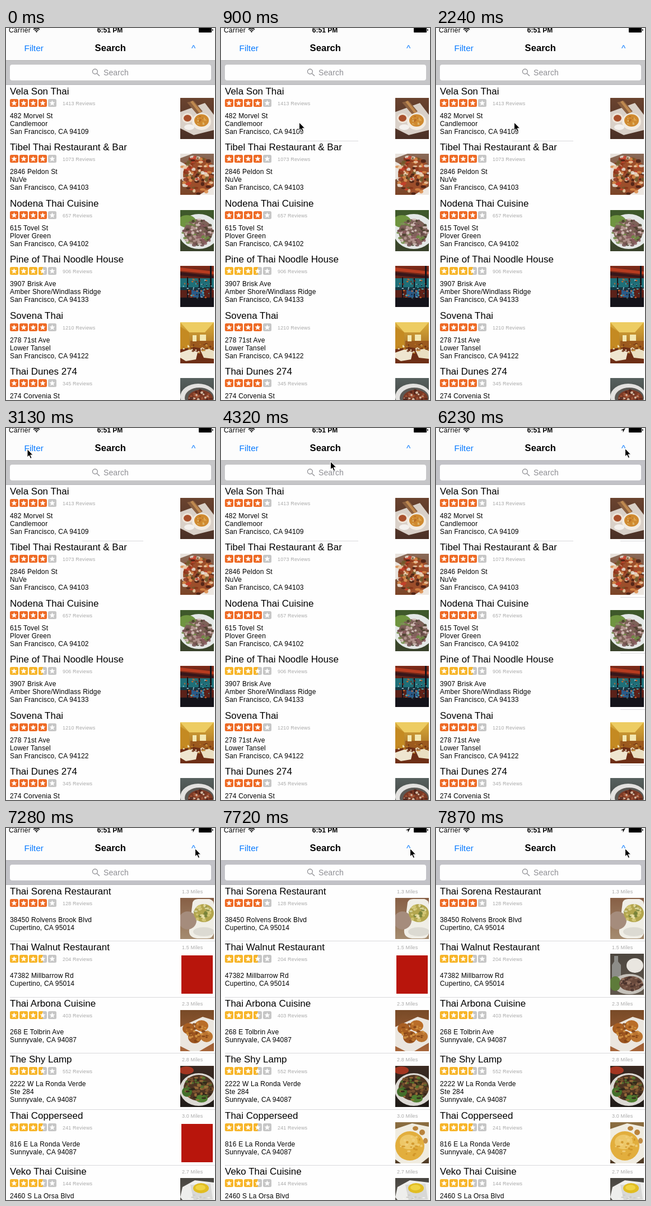
Animation, 373 px wide and 660 px high, one loop 8 s. Source, as an HTML page:

```html
<!DOCTYPE html>
<html lang="en">
<head>
<meta charset="utf-8">
<title>Restaurant search</title>
<style>
  html, body { margin: 0; width: 100%; height: 100%; overflow: hidden; background: #fefefe; }
  svg { display: block; }
  text { font-family: "Liberation Sans", Arial, sans-serif; white-space: pre; }
  .name { font-size: 17px; }
  .addr { font-size: 12px; letter-spacing: .2px; }
  .small { font-size: 9px; letter-spacing: .15px; fill: #aaa; }
  .blue { font-size: 15.5px; fill: #0a7bff; }
</style>
</head>
<body>
<script>
const LOOP = 8000;
const NS = "http://www.w3.org/2000/svg";

function add(parent, tag, attrs = {}, text) {
  const el = document.createElementNS(NS, tag);
  for (const k in attrs) el.setAttribute(k, attrs[k]);
  if (text !== undefined) el.textContent = text;
  parent.append(el);
  return el;
}
const rect = (p, x, y, width, height, fill, more) => add(p, "rect", { x, y, width, height, fill, ...more });
const label = (p, x, y, cls, text, more) => add(p, "text", { x, y, class: cls, ...more }, text);

function random(seed) {
  return () => {
    seed = (seed * 16807) % 2147483647;
    return seed / 2147483647;
  };
}

// Photos: base tones, shapes as [fill, path] or [fill, cx, cy, rx, ry], then scattered bits
const photos = {
  platter: {
    base: ["#6a432f", "#4a3026"],
    shapes: [["#d9d0c8", "M0 25L44 9L60 30V57L24 66L0 54Z"], ["#8d6140", "M12 8L24 5L40 24L30 29Z"],
      ["#c08a50", "M18 7L22 5L38 25L34 27Z"], ["#eee4d8", 13, 36, 10, 9], ["#a9502c", 13, 36, 7, 6],
      ["#f3ece2", 38, 42, 17, 15], ["#cf8a30", 38, 40, 13, 11], ["#f4f1ee", 16, 52, 9, 5]],
    bits: { seed: 11, colors: ["#e6b258", "#b26424", "#e0c58a"], at: [37, 40, 10, 8], n: 16, size: 3 }
  },
  stirFry: {
    base: ["#8a6a58", "#7b4426"],
    shapes: [["#e8e2dc", "M0 8L22 0H0ZM0 14L16 22L8 42L0 46Z"], ["#9c4e2b", 34, 38, 29, 32],
      ["#eee8e2", "M34 73L60 58V73Z"]],
    bits: { seed: 23, colors: ["#d98a48", "#8c3219", "#efcfaa", "#c6412a", "#4a2216", "#e9e2d6", "#6f5a2c"], at: [31, 38, 30, 34], n: 110, size: 7 }
  },
  salad: {
    base: ["#3f5a2b", "#39422b"],
    shapes: [["#e4e8e6", 33, 38, 36, 31], ["#6f9540", 12, 20, 16, 11], ["#7d6258", 32, 39, 26, 23]],
    bits: { seed: 37, colors: ["#b99a95", "#6f4c4c", "#6d8a42", "#d9c6c0", "#8b5c60", "#46402c"], at: [32, 39, 27, 24], n: 105, size: 6 }
  },
  bar: {
    base: ["#7e2a18", "#15141c"],
    shapes: [["#b83c20", "M0 3L60 10V15L0 9Z"], ["#37161a", "M0 11L60 18V22L0 17Z"], ["#1f6f78", "M0 22H60V38H0Z"],
      ["#143844", "M0 38H60V43H0Z"], ["#5a2119", "M0 43H20V56H0ZM42 40H60V56H42Z"], ["#2a5c8a", "M20 43H42V56H20Z"],
      ["#14131a", "M0 57H60V73H0ZM53 0H56V60H53ZM12 20H14V57H12ZM33 22H35V57H33Z"]],
    bits: { seed: 41, colors: ["#4fc0c4", "#d26a2d", "#1c2230", "#7a2218", "#9cc6d6"], at: [30, 41, 30, 18], n: 60, size: 3 }
  },
  room: {
    base: ["#dcae3a", "#8a4d1a"],
    shapes: [["#edcc62", "M0 0H60L44 18H16Z"], ["#c48a22", "M0 8L16 18V46L0 52Z"], ["#9c5a1e", "M18 33H60V48H18Z"],
      ["#f3e7b0", "M22 23H29V34H22ZM35 22H46V33H35Z"], ["#6e2f16", "M0 48L24 44L60 50V73H0Z"],
      ["#efe6d0", "M0 54L17 48L31 53L28 66L10 69L0 63Z"], ["#eadfc2", "M36 50L52 47L60 51V65L42 63Z"]],
    bits: { seed: 53, colors: ["#6a3014", "#f3e9c8", "#b97a22"], at: [31, 46, 28, 9], n: 30, size: 4 }
  },
  bowl: {
    base: ["#57615f", "#33302e"],
    shapes: [["#e2e1df", 32, 33, 32, 23], ["#5c5a56", 34, 35, 26, 18], ["#7c3a25", 36, 36, 22, 15]],
    bits: { seed: 61, colors: ["#a9583a", "#e2cdb6", "#4f231a"], at: [36, 36, 20, 14], n: 34, size: 5 }
  },
  curry: {
    base: ["#875f45", "#a58c70"],
    shapes: [["#f0eee6", "M22 8Q24 2 32 2H52Q60 4 60 12V62Q58 72 48 72H30Q14 70 16 56Z"], ["#a58c7c", 13, 40, 16, 16],
      ["#b3a64e", 42, 27, 18, 16], ["#dcdad2", 42, 60, 19, 8]],
    bits: { seed: 71, colors: ["#d3c877", "#738037", "#e9dfa8"], at: [41, 27, 16, 14], n: 34, size: 6 }
  },
  rice: {
    base: ["#4d4740", "#60564c"],
    shapes: [["#8d8d89", "M7 4H14V14L19 20V44H3V20L7 14Z"], ["#e9e6e0", 44, 21, 15, 13], ["#c5c1ba", 34, 54, 29, 18],
      ["#5e7b3a", 9, 53, 10, 13], ["#6a4a3c", 37, 53, 21, 13]],
    bits: { seed: 83, colors: ["#9a7866", "#46302a", "#7d5a4b"], at: [37, 53, 20, 12], n: 50, size: 5 }
  },
  fritters: {
    base: ["#784a27", "#a7653a"],
    shapes: [["#ebe6df", "M0 30L40 12L60 18V58L34 73H18L0 64Z"], ["#a95f22", 15, 33, 11, 10], ["#b96d28", 38, 28, 12, 10],
      ["#9c5520", 26, 48, 12, 11], ["#bb7430", 47, 47, 11, 10]],
    bits: { seed: 97, colors: ["#d29548", "#834315", "#c5802f"], at: [31, 40, 23, 16], n: 40, size: 5 }
  },
  greens: {
    base: ["#3b2a22", "#1f1b18"],
    shapes: [["#a43520", 11, 8, 13, 7], ["#dcd9d4", 33, 42, 34, 29], ["#4d3523", 33, 39, 27, 23],
      ["#426f2a", 12, 46, 9, 9], ["#4f7e30", 38, 58, 11, 7]],
    bits: { seed: 101, colors: ["#7e5530", "#2f2119", "#55782f", "#a0713c"], at: [33, 39, 25, 22], n: 70, size: 6 }
  },
  tray: {
    base: ["#8d6f41", "#4f3a25"],
    shapes: [["#f0ece0", "M0 12L30 2L60 8V62L46 73H10L0 66Z"], ["#e2ae3d", 26, 42, 26, 26], ["#edc768", 24, 35, 16, 13],
      ["#b9833c", 36, 11, 5, 4], ["#b9833c", 48, 18, 5, 5], ["#c18d45", 54, 33, 4, 5]],
    bits: { seed: 113, colors: ["#f1cf7b", "#cf9226"], at: [28, 42, 20, 20], n: 22, size: 5 }
  },
  takeaway: {
    base: ["#47443f", "#75726c"],
    shapes: [["#eeeeec", "M4 16L26 4L60 8V46H10L0 34Z"], ["#d8d8d6", "M18 12L54 10L58 38L24 40Z"],
      ["#e1bd22", 37, 18, 14, 9], ["#f0d445", 36, 17, 9, 5]],
    bits: { seed: 127, colors: ["#f4f4f2", "#c9c8c4"], at: [34, 35, 20, 6], n: 10, size: 4 }
  }
};

// name | rating | reviews | distance | photo | address lines
const firstList = [
  "Vela Son Thai|4|1413||platter|482 Morvel St|Candlemoor|San Francisco, CA 94109",
  "Tibel Thai Restaurant & Bar|4|1073||stirFry|2846 Peldon St|NuVe|San Francisco, CA 94103",
  "Nodena Thai Cuisine|4|657||salad|615 Tovel St|Plover Green|San Francisco, CA 94102",
  "Pine of Thai Noodle House|3.5|906||bar|3907 Brisk Ave|Amber Shore/Windlass Ridge|San Francisco, CA 94133",
  "Sovena Thai|4|1210||room|278 71st Ave|Lower Tansel|San Francisco, CA 94122",
  "Thai Dunes 274|4|345||bowl|274 Corvenia St||"
];
const secondList = [
  "Thai Sorena Restaurant|4|128|1.3|curry|38450 Rolvens Brook Blvd|Cupertino, CA 95014",
  "Thai Walnut Restaurant|3.5|204|1.5|rice|47382 Millbarrow Rd|Cupertino, CA 95014",
  "Thai Arbona Cuisine|3.5|403|2.3|fritters|268 E Tolbrin Ave|Sunnyvale, CA 94087",
  "The Shy Lamp|3.5|552|2.8|greens|2222 W La Ronda Verde|Ste 284|Sunnyvale, CA 94087",
  "Thai Copperseed|3.5|241|3.0|tray|816 E La Ronda Verde|Sunnyvale, CA 94087",
  "Veko Thai Cuisine|3.5|144|2.7|takeaway|2460 S La Orsa Blvd||"
];

const rowTop = i => Math.round(101 + 99.4 * i);

const starPath = Array.from({ length: 10 }, (_, k) => {
  const r = k % 2 ? 2.3 : 5.5, a = (k * 36 - 90) * Math.PI / 180;
  return (k ? "L" : "M") + (7.5 + r * Math.cos(a)).toFixed(2) + " " + (7.4 + r * Math.sin(a)).toFixed(2);
}).join("") + "Z";

function drawStars(parent, y, rating) {
  const color = rating === 4 ? "#ee6a25" : "#f7b529";
  for (let i = 0; i < 5; i++) {
    const g = add(parent, "g", { transform: `translate(${7 + 17 * i} ${y})` });
    const part = Math.max(0, Math.min(1, rating - i));
    rect(g, 0, 0, 15, 14, part === 1 ? color : "#c6c6c6", { rx: 2.5 });
    if (part === 0.5) add(g, "path", { d: "M7.5 0H2.5Q0 0 0 2.5V11.5Q0 14 2.5 14H7.5Z", fill: color });
    add(g, "path", { d: starPath, fill: "#fff" });
  }
}

function drawPhoto(parent, y, key) {
  const { base, shapes, bits } = photos[key];
  const box = add(parent, "svg", { x: 311, y, width: 60, height: 73 });
  const grad = add(box, "linearGradient", { id: key, x2: 0, y2: 1 });
  base.forEach((c, i) => add(grad, "stop", { offset: i, "stop-color": c }));
  rect(box, 0, 0, 60, 73, `url(#${key})`);
  for (const [fill, first, cy, rx, ry] of shapes) {
    if (typeof first === "string") add(box, "path", { d: first, fill });
    else add(box, "ellipse", { cx: first, cy, rx, ry, fill });
  }
  const rnd = random(bits.seed), [x0, y0, w, h] = bits.at;
  for (let i = 0; i < bits.n; i++) {
    const a = rnd() * Math.PI * 2, d = Math.sqrt(rnd());
    add(box, "ellipse", {
      cx: x0 + w * d * Math.cos(a), cy: y0 + h * d * Math.sin(a),
      rx: bits.size * (0.3 + 0.4 * rnd()), ry: bits.size * (0.2 + 0.3 * rnd()),
      fill: bits.colors[i % bits.colors.length], opacity: 0.85
    });
  }
  return box;
}

function drawList(parent, rows) {
  const g = add(parent, "g");
  const pictures = rows.map((row, i) => {
    const [name, rating, reviews, miles, photo, ...lines] = row.split("|");
    const y = rowTop(i);
    label(g, 7, y + 17, "name", name);
    drawStars(g, y + 25, +rating);
    label(g, 101, y + 36, "small", reviews + " Reviews");
    if (miles) label(g, 314, y + 15, "small", miles + " Miles");
    const first = lines.length === 3 ? 59 : 66;
    lines.forEach((line, k) => label(g, 7, y + first + 14 * k, "addr", line));
    return drawPhoto(g, y + 23, photo);
  });
  return { g, pictures };
}

const line = (p, x, y, w) => rect(p, x, y, w, 1, "#d9d9dc");

const stage = add(document.body, "svg", { width: 373, height: 660, viewBox: "0 0 373 660" });
rect(stage, 0, 0, 373, 660, "#fefefe");

// Results
const before = drawList(stage, firstList);
const shortLine = line(before.g, 136, 200, 109);
const rightLines = add(before.g, "g");
const after = drawList(stage, secondList);
for (let i = 1; i < 6; i++) {
  line(rightLines, 329, rowTop(i), 44);
  line(after.g, 7, rowTop(i), 366);
}
const placeholder = i => rect(after.g, 313, rowTop(i) + 26, 56, 68, "#b8150c");
const badge2 = placeholder(1), badge5 = placeholder(4);

// Status bar
rect(stage, 0, 0, 373, 57, "#fcfcfc");
label(stage, 5, 8, "", "Carrier", { "font-size": 12, "letter-spacing": .35 });
const wifi = add(stage, "g", { fill: "none", stroke: "#000", "stroke-width": 1.7 });
for (const r of [4.6, 7.6]) {
  const k = r * Math.SQRT1_2;
  add(wifi, "path", { d: `M${54.5 - k} ${8 - k}A${r} ${r} 0 0 1 ${54.5 + k} ${8 - k}` });
}
add(stage, "path", { d: "M54.5 8L52.5 6Q54.5 4.4 56.5 6Z" });
label(stage, 185.5, 8, "", "6:51 PM", { "font-size": 12, "font-weight": 700, "text-anchor": "middle" });
rect(stage, 344, -1, 23, 9, "#000", { rx: 1 });
rect(stage, 368, 2, 1.5, 3, "#000");
const locator = add(stage, "path", { d: "M338 0L329.5 4H333.7V8Z" });

// Navigation and search bars
label(stage, 32.5, 41, "blue", "Filter");
label(stage, 186.3, 41, "", "Search", { "font-size": 16.6, "font-weight": 700, "text-anchor": "middle" });
const caret = label(stage, 331, 41, "blue", "^");
const bar = rect(stage, 0, 57, 373, 44, "#c6c6c8");
rect(stage, 0, 57, 373, 1, "#b4b4b6");
rect(stage, 0, 100, 373, 1, "#b4b4b8");
rect(stage, 7, 65, 359, 28, "#fefefe", { rx: 4 });
add(stage, "path", {
  d: "M154.5 77.3a4.4 4.4 0 1 0 8.8 0a4.4 4.4 0 1 0 -8.8 0M162.2 80.6L167 85",
  fill: "none", stroke: "#85858a", "stroke-width": 1.2
});
label(stage, 174, 84, "", "Search", { "font-size": 14, "letter-spacing": .1, fill: "#8e8e93" });

const cursor = add(stage, "path", {
  d: "M0 0V14.3L3.2 11.3L5.7 16.8L8.1 15.7L5.6 10.4H10.2Z",
  fill: "#000", stroke: "#fff", "stroke-width": 1, "stroke-linejoin": "round"
});

// time, x, y
const cursorSteps = [
  [750, 231, 274], [900, 139.5, 167.5], [2390, 65, 113], [2540, 47.5, 84.5], [2690, 40.5, 55.5],
  [2830, 38.5, 43.5], [2980, 38, 38.5], [3130, 38, 37.5], [4180, 77.5, 38.5], [4320, 195.5, 59.5],
  [4470, 262.5, 57.5], [4610, 293.5, 53.5], [4760, 317.5, 42.5], [4910, 337.5, 36.5]
];
const caretSteps = [[0, 1], [5060, .25], [5200, .5], [5350, .8], [5490, 1]];

const stepAt = (steps, t) => steps.filter(s => s[0] <= t).pop();
const show = (el, on) => el.setAttribute("visibility", on ? "inherit" : "hidden");

function draw(t) {
  const pos = stepAt(cursorSteps, t);
  show(cursor, pos);
  if (pos) cursor.setAttribute("transform", `translate(${pos[1]} ${pos[2]})`);
  caret.setAttribute("opacity", stepAt(caretSteps, t)[1]);
  bar.setAttribute("fill", t < 5060 ? "#c6c6c8" : "#c2c2c7");
  show(locator, t >= 6230);
  show(shortLine, t >= 900);
  show(rightLines, t >= 5060);
  show(badge5, t < 7720);
  show(after.pictures[4], t >= 7720);
  show(badge2, t < 7870);
  show(after.pictures[1], t >= 7870);
  before.g.style.display = t < 7280 ? "" : "none";
  after.g.style.display = t < 7280 ? "none" : "";
}

const start = performance.now();
function tick() {
  draw((performance.now() - start) % LOOP);
  requestAnimationFrame(tick);
}
tick();
</script>
</body>
</html>
```
